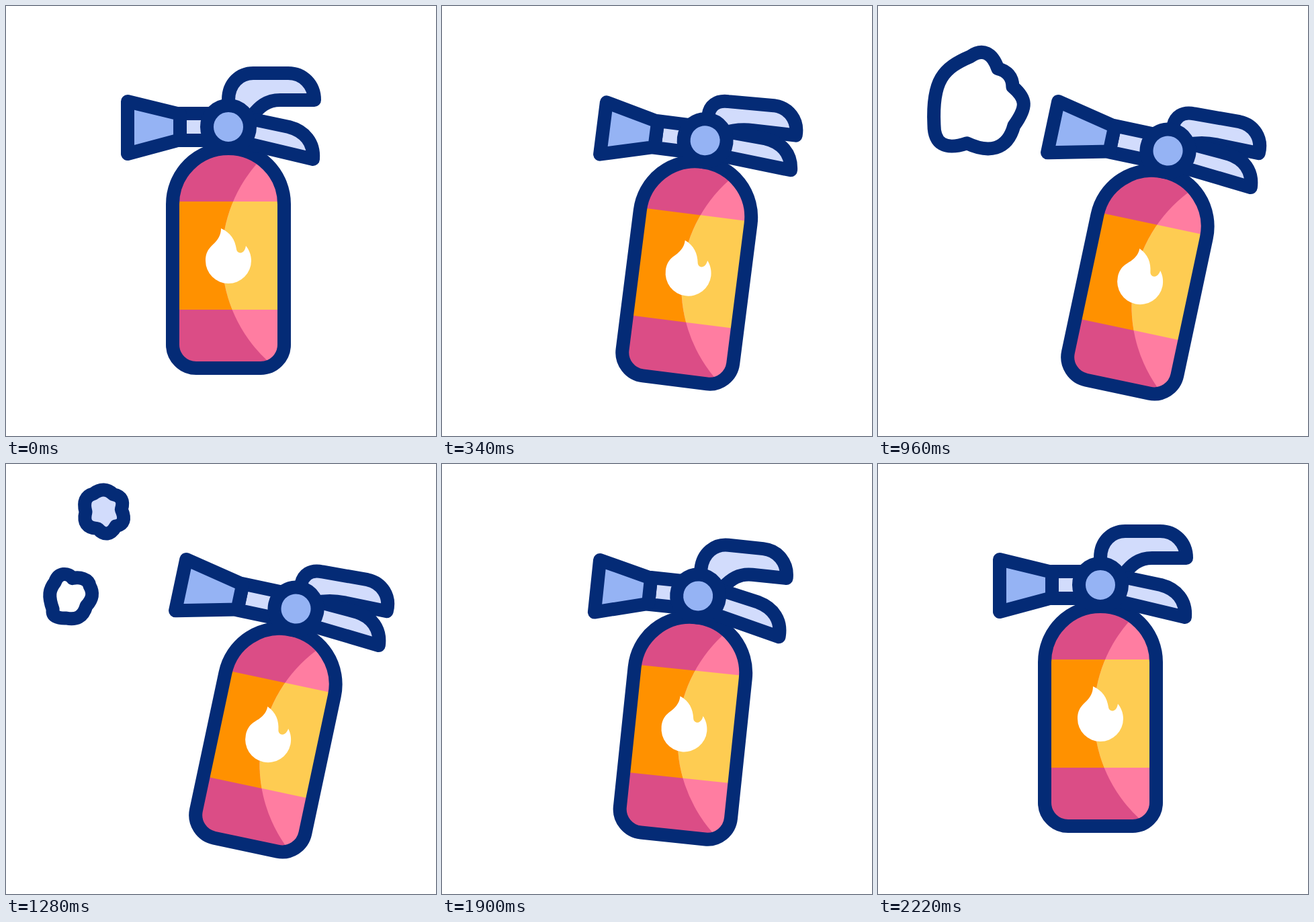
Recreate the animation shown at these times as an HTML page. Size 640 by 640 pixels, loop 2420 ms.

```html
<!DOCTYPE html>
<html lang="en">
<head>
<meta charset="utf-8">
<title>Fire extinguisher</title>
<style>
  html, body { margin: 0; height: 100%; overflow: hidden; background: #fff; }
  svg { display: block; width: 100vw; height: 100vh; }
  .line { stroke: #042b76; stroke-width: 20; stroke-linejoin: round; stroke-linecap: round; }
  #puffs path { vector-effect: non-scaling-stroke; }
</style>
</head>
<body>
<svg viewBox="0 0 640 640">
  <defs>
    <path id="shell" d="M248 295a83 83 0 0 1 166 0V504a35 35 0 0 1-35 35H283a35 35 0 0 1-35-35Z"/>
    <clipPath id="inside"><use href="#shell"/></clipPath>
    <clipPath id="shine"><path d="M373 235A211 211 0 0 0 388 527L424 560V200Z"/></clipPath>
  </defs>
  <g id="tool">
    <g id="puffs" class="line" transform="rotate(-12 331 400) translate(-54.8 -30.7)">
      <path id="bluePuff" fill="#d2dcfc" d="M122 57Q117 38 132 34Q145 24 157 35Q172 38 167 54Q175 72 160 75Q150 92 137 78Q117 77 122 57Z"/>
      <path id="whitePuff" fill="#fff"/>
    </g>
    <g class="line">
      <path id="neck" fill="#d2dcfc"/>
      <path id="cone" fill="#95b3f4"/>
    </g>
    <g clip-path="url(#inside)">
      <path fill="#db4d86" d="M240 200H424V550H240Z"/>
      <path fill="#ff9100" d="M240 291H424V452H240Z"/>
      <g clip-path="url(#shine)">
        <path fill="#ff7da1" d="M240 200H424V550H240Z"/>
        <path fill="#fecc52" d="M240 291H424V452H240Z"/>
      </g>
    </g>
    <path fill="#fff" d="M320 331C334 337 341 348 343 362C344 369 355 371 357 357C362 363 365 371 365 379A34 34 0 0 1 297 379C297 362 307 357 312 351C318 344 320 338 320 331Z"/>
    <g class="line">
      <use href="#shell" fill="none"/>
      <path id="upper" fill="#d2dcfc"/>
      <path id="lower" fill="#d2dcfc" d="M331 161L421 180C444 186 459 203 457 228L331 198Z"/>
      <circle cx="331" cy="180" r="32" fill="#95b3f4"/>
    </g>
  </g>
</svg>
<script>
  const LOOP = 2420;
  const cloud = 'M138 75C157 62 171 70 179 93C192 96 201 105 201 120C222 138 223 150 203 178' +
    'C193 215 165 219 133 204C100 215 84 205 84 176C81 110 98 92 138 75Z';
  const wisp = 'M64 190C67 175 82 174 88 181C98 178 112 180 114 190C118 200 116 208 108 216' +
    'C104 230 96 234 84 233C74 232 66 230 68 222C60 208 60 200 64 190Z';
  const leverOpen = 'M331 180L331 140C331 115 348 100 368 100L420 100C442 100 459 117 459 140L408 140C388 140 377 150 366 164Z';
  const leverShut = 'M331 180L331 142C331 128 340 118 358 118L426 115.5C448 115.5 465 132 464 155.5L400 156C385 156 370 159 355 166Z';

  const set = (id, name, value) => document.getElementById(id).setAttribute(name, value);
  const ramp = (t, a, b) => Math.min(1, Math.max(0, (t - a) / (b - a)));
  const ease = (t, a, b) => { const u = ramp(t, a, b); return u * u * (3 - 2 * u); };
  const easeOut = (t, a, b) => 1 - (1 - ramp(t, a, b)) ** 3;
  const mix = (a, b, k) => a + (b - a) * k;
  const zoom = (x, y, s) => `translate(${x} ${y}) scale(${s}) translate(${-x} ${-y})`;

  // Blends two paths that have the same commands
  function blend(from, to, k) {
    const ends = to.match(/[\d.]+/g);
    let i = 0;
    return from.replace(/[\d.]+/g, v => mix(+v, +ends[i++], k).toFixed(2));
  }

  function drawPuffs(t) {
    const show = t > 362 && t < 1718;
    set('whitePuff', 'visibility', show ? 'visible' : 'hidden');
    set('bluePuff', 'visibility', show && t > 1000 ? 'visible' : 'hidden');
    if (!show) return;

    const fade = 1 - ramp(t, 1600, 1720);
    const grow = 0.72 * easeOut(t, 350, 480) + 0.03 * ramp(t, 480, 600) + 0.26 * ease(t, 600, 1000);
    const split = easeOut(t, 960, 1600);
    set('whitePuff', 'd', blend(cloud, wisp, split));
    set('whitePuff', 'transform', t < 1600 ? zoom(253, 180, mix(grow, 1, split)) : zoom(89, 205, fade));

    const rise = easeOut(t, 1000, 1600);
    const size = fade * (1 + 0.4 * Math.sin(Math.PI * rise));
    set('bluePuff', 'transform', `translate(${5 * (1 - rise)} ${94 * (1 - rise)}) ${zoom(145, 56, size)}`);
  }

  function draw(t) {
    const lean = ease(t, 0, 600) - ease(t, 1580, 2220);
    const squeeze = ease(t, 0, 300) - ease(t, 1440, 1740);
    const stretch = ease(t, 300, 500) - ease(t, 1600, 1940);
    const left = 181 - 25 * stretch, right = 259 - 13 * stretch;

    set('tool', 'transform', `translate(${54.8 * lean} ${30.7 * lean}) rotate(${12 * lean} 331 400)`);
    set('upper', 'd', blend(leverOpen, leverShut, squeeze));
    set('lower', 'transform', `rotate(${-9 * squeeze} 331 180)`);
    set('cone', 'd', `M${left} 142L${right} 161V199L${left} 220Z`);
    set('neck', 'd', `M331 160H${right}V200H331`);
    drawPuffs(t);
  }

  function tick() {
    draw(performance.now() % LOOP);
    requestAnimationFrame(tick);
  }
  tick();
</script>
</body>
</html>
```
